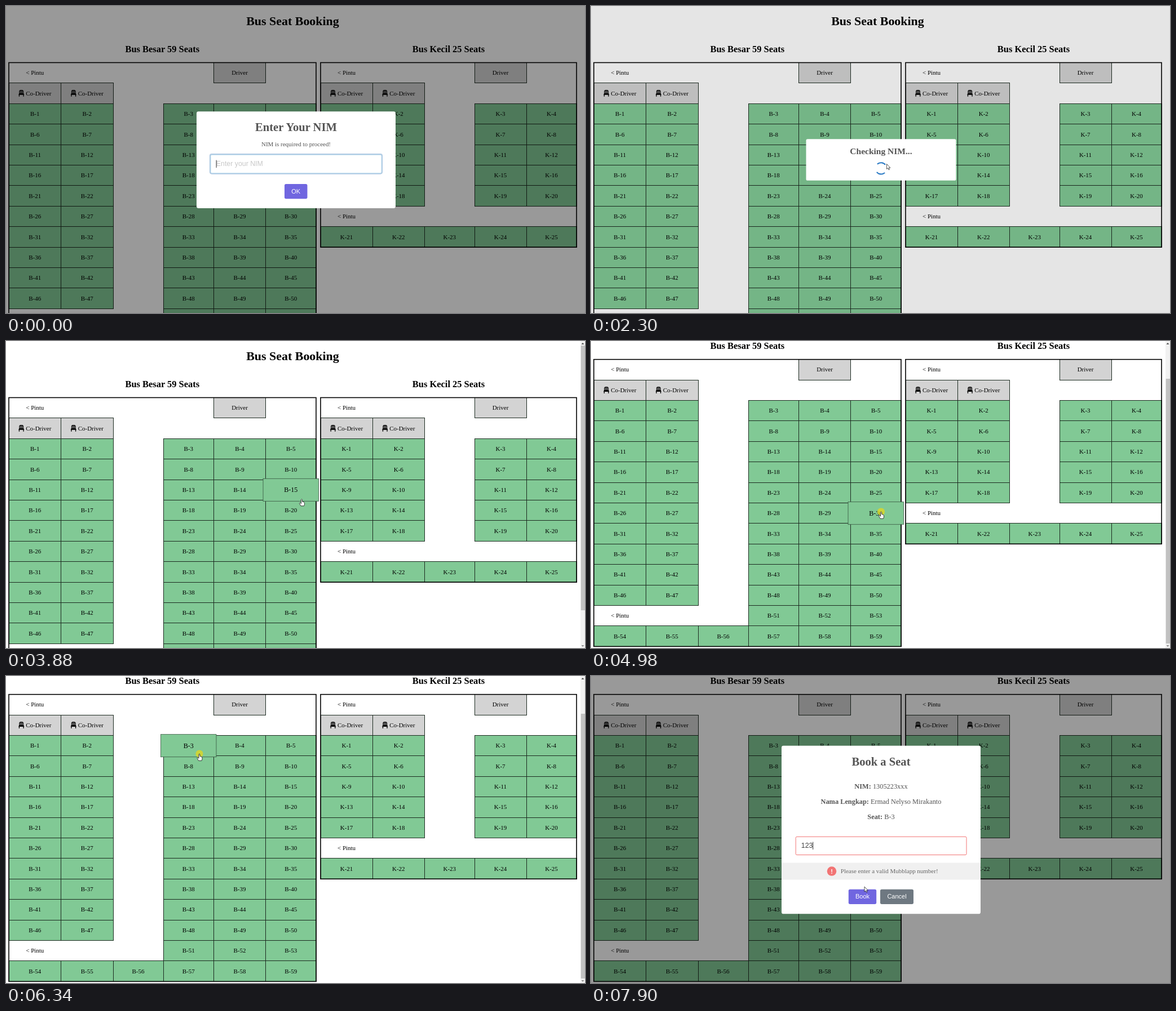
These frames come from a looping animation (1027x545 px, 8000 ms). An HTML page:

```html
<!DOCTYPE html>
<html lang="id">
<head>
<meta charset="utf-8">
<title>Bus Seat Booking</title>
<style>
  html, body { margin: 0; width: 100%; height: 100%; overflow: hidden; background: #fff; }
  svg { display: block; width: 1027px; height: 545px; }
  text { font: 10.97px "Liberation Serif", "Times New Roman", serif; text-anchor: middle; white-space: pre; }
  .h1 { font-size: 21.95px; font-weight: bold; }
  .h2 { font-size: 16.46px; font-weight: bold; }
  .cell { stroke: #1c2a20; stroke-width: 1; shape-rendering: crispEdges; }
  .frame { fill: none; stroke: #000; stroke-width: 1.6; }
  .popup text { fill: #545454; }
  .popup .title { font-size: 20.58px; font-weight: bold; }
  .popup .info { font-size: 12.35px; }
  .popup .field { font: 12.35px "Liberation Sans", Arial, sans-serif; text-anchor: start; }
  .popup .btn { font: 10.97px "Liberation Sans", Arial, sans-serif; fill: #fff; }
</style>
</head>
<body>
<svg viewBox="0 0 1027 545">
  <rect width="1027" height="545" fill="#fff"/>
  <g id="page"></g>
  <g id="hover"></g>
  <g id="scrollbar">
    <rect x="1019" width="8" height="545" fill="#f1f1f1"/>
    <path d="M1020.5 6L1023 3L1025.5 6Z" fill="#505050"/>
    <path d="M1020.5 540L1023 543L1025.5 540Z" fill="#8a8a8a"/>
    <rect id="thumb" x="1019.7" width="7.3" height="470" fill="#c1c1c1"/>
  </g>
  <rect id="backdrop" width="1027" height="545"/>
  <g id="popup" class="popup"></g>
  <circle id="click" r="6.6" fill="#d8d62c" opacity=".85"/>
  <path id="cursor" stroke-linejoin="round"/>
</svg>
<script>
const $ = id => document.getElementById(id);
const LOOP = 8000, ROW = 36.4, TOP = 100.5, MID_X = 514.5, MID_Y = 273.1, SCROLL = 67.8;
const GREEN = '#81c995', GREY = '#d3d3d3';

const clamp = v => Math.max(0, Math.min(1, v));
const mix = (a, b, p) => a + (b - a) * p;

// CSS "ease": cubic-bezier(.25, .1, .25, 1)
function ease(x) {
  x = clamp(x);
  let lo = 0, hi = 1, u = .5;
  for (let i = 0; i < 20; i++) {
    u = (lo + hi) / 2;
    const bx = .75 * u * (1 - u) + u ** 3;
    if (bx < x) lo = u; else hi = u;
  }
  return .3 * u * (1 - u) ** 2 + 3 * u * u * (1 - u) + u ** 3;
}

// Interpolates rows of [time, ...values]
function track(keys, t) {
  if (t <= keys[0][0]) return keys[0].slice(1);
  for (let i = 1; i < keys.length; i++) {
    const a = keys[i - 1], b = keys[i];
    if (t < b[0]) return a.slice(1).map((v, j) => mix(v, b[j + 1], ease((t - a[0]) / (b[0] - a[0]))));
  }
  return keys[keys.length - 1].slice(1);
}

const text = (s, x, y, cls = '', extra = '') => `<text x="${x}" y="${y}" class="${cls}" ${extra}>${s}</text>`;
const box = (x, y, w, h, attrs) => `<rect x="${x}" y="${y}" width="${w}" height="${h}" ${attrs}/>`;

// ---- Page ----
const seats = [];
const bigCols = [5, 97.5, 190, 279, 368.5, 460.5, 550];
const smallCols = [558, 650, 742.5, 831, 923, 1012];

function cell(cols, col, row, label, fill) {
  const x = cols[col], w = cols[col + 1] - x, y = TOP + row * ROW;
  const cx = x + w / 2, base = y + ROW / 2 + 3.6;
  if (fill === GREEN) seats.push({ x, y, w, label });
  return (fill ? box(x, y, w, ROW, `class="cell" fill="${fill}"`) : '') +
    (label === 'Co-Driver' ? chair(cx - 24, y + ROW / 2) + text(label, cx + 6.5, base) : text(label, cx, base));
}

function chair(x, y) {
  return `<g transform="translate(${x} ${y})"><path d="M-3.2 0V-3.5Q-3.2-5.4-1.2-5.4H1.2Q3.2-5.4 3.2-3.5V0M-1.1-5V0M1.1-5V0M-3.8 2V5.6M3.8 2V5.6" fill="none" stroke="#000" stroke-width="1.3"/><path d="M-4-.2H4L5 2.6H-5Z"/></g>`;
}

function bus(prefix, cols, rows, doorRow, driverCol) {
  const last = cols.length - 2;
  let n = 0, out = cell(cols, 0, 0, '&lt; Pintu') + cell(cols, driverCol, 0, 'Driver', GREY) +
    cell(cols, 0, 1, 'Co-Driver', GREY) + cell(cols, 1, 1, 'Co-Driver', GREY) +
    cell(cols, 0, doorRow, '&lt; Pintu');
  for (let row = 2; row < rows; row++) {
    for (let col = 0; col <= last; col++) {
      const aisle = col === 2 && row < rows - 1;
      const door = row === doorRow && (col < 3 || prefix === 'K');
      if (!aisle && !door) out += cell(cols, col, row, `${prefix}-${++n}`, GREEN);
    }
  }
  return out + box(cols[0], TOP, cols[last + 1] - cols[0], rows * ROW, 'class="frame"');
}

$('page').innerHTML = text('Bus Seat Booking', 508.5, 34, 'h1') +
  text('Bus Besar 59 Seats', 277.3, 82.3, 'h2') + text('Bus Kecil 25 Seats', 785, 82.3, 'h2') +
  bus('B', bigCols, 14, 12, 4) + bus('K', smallCols, 9, 7, 3);

// ---- Timeline ----
const popups = [
  { kind: 'nim', from: -1000, to: 2283 },
  { kind: 'load', title: 'Checking NIM...', from: 2283, to: 3397 },
  { kind: 'load', title: 'Loading seats...', from: 3397, to: 3720, closes: true },
  { kind: 'book', seat: 'B-30', from: 5130, to: 5920, closes: true },
  { kind: 'book', seat: 'B-3', from: 6380, to: LOOP, settle: 225 }
];
const HIDE = 150, ERROR_AT = 7840;
const showKeys = [[0, .7], [135, 1.05], [240, .95], [300, 1]];
const nimKeys = [670, 900, 1150, 1400, 1620, 1650, 1680, 2030, 2060, 2100];
const phoneKeys = [7500, 7560, 7630];
const clicks = [[4980, 5120], [5850, 5980], [6290, 6420], [7770, 7835]];
const scrollKeys = [[4160, 0], [4450, SCROLL]];
const mouseKeys = [
  [2283, 524.5, 280.5], [4450, 524.5, 280.5], [4850, 514.5, 303], [5350, 514.5, 303],
  [5700, 543.5, 371], [5930, 543.5, 371], [6260, 343, 138], [6540, 343, 138],
  [6610, 376, 231], [6880, 447, 324], [7630, 447, 324], [7760, 485, 374]
];
const typed = (s, times, t) => s.slice(0, times.filter(k => t >= k).length);
const caretOn = t => !(t >= 270 && t < 670) && !(t >= 7300 && t < 7500);

// ---- Popup ----
const heights = { nim: 171.6, load: 97.6, book: 256.5, error: 298.5 };

function field(y, value, hint, error, t) {
  const ring = error ? '' : box(362, y - 1, 305, 34.5, 'rx="3" fill="none" stroke="#b1cae3" stroke-width="2.2"');
  const caretX = 373 + [...value].reduce((w, c) => w + (c === 'x' ? 6.18 : 6.87), 0);
  return ring +
    box(363.2, y + .3, 302.8, 32.2, `rx="2" fill="#fff" stroke="${error ? '#f27474' : '#b4dbed'}" stroke-width="${error ? 1 : .8}"`) +
    text(value || hint, 372.8, y + 20.2, 'field', `style="fill:${value ? '#444' : '#c8c8c8'}"`) +
    (caretOn(t) ? box(caretX - .4, y + 9.5, 1, 13.5, 'fill="#333"') : '');
}

const button = (label, x, y, w, fill, hot) =>
  box(x, y, w, 26.3, `rx="2.7" fill="${fill}"`) +
  (hot ? box(x, y, w, 26.3, 'rx="2.7" fill="#000" opacity=".1"') : '') +
  text(label, x + w / 2, y + 16.8, 'btn');

const info = (name, value, y) => text(`<tspan font-weight="bold">${name}:</tspan> ${value}`, MID_X, y, 'info');

function spinner(y, age) {
  const r = 13.4, d = r * Math.SQRT1_2;
  const arc = s => `M${-d * s} ${-d * s}A${r} ${r} 0 0 1 ${d * s} ${-d * s}`;
  return `<path d="${arc(1)}${arc(-1)}" transform="translate(${MID_X} ${y}) rotate(${age * .24})" fill="none" stroke="#2778c4" stroke-width="2.75"/>`;
}

function popupMarkup(p, t, mouse) {
  const error = p.kind === 'book' && t >= ERROR_AT;
  const h = heights[error ? 'error' : p.kind], y = MID_Y - h / 2;
  const title = { nim: 'Enter Your NIM', book: 'Book a Seat' }[p.kind] || p.title;
  let out = box(338, y, 353, h, 'rx="3.4" fill="#fff"') + text(title, MID_X, y + 35, 'title');
  let hand = false, beam = false;
  if (p.kind === 'nim') {
    out += text('NIM is required to proceed!', MID_X, y + 61.5) +
      field(y + 76.8, typed('1305223xxx', nimKeys, t), 'Enter your NIM', false, t) +
      button('OK', 494, y + 128.7, 40.5, '#7066e0');
  } else if (p.kind === 'load') {
    out += spinner(y + 69, t - p.from);
  } else {
    const by = y + (error ? 254.8 : 213.3);
    const onRow = mouse.y >= by && mouse.y <= by + 26.3;
    const over = (x, w) => onRow && mouse.x >= x && mouse.x <= x + w;
    const onBook = over(456.8, 49.4), onCancel = over(513, 59);
    hand = onBook || onCancel;
    beam = mouse.x > 363 && mouse.x < 666 && mouse.y > y + 161 && mouse.y < y + 194;
    out += info('NIM', '1305223xxx', y + 76.2) +
      info('Nama Lengkap', 'Ermad Nelyso Mirakanto', y + 103) +
      info('Seat', p.seat, y + 129.8) +
      field(y + 161.2, typed('123', phoneKeys, t), 'No. MB Aktif', error, t);
    if (error) {
      out += box(338, y + 207.7, 353, 30, 'fill="#f0f0f0"') +
        `<circle cx="427" cy="${y + 222.7}" r="8.3" fill="#f27474"/>` +
        text('!', 427, y + 226.7, 'btn', 'style="font-weight:bold"') +
        text('Please enter a valid Mubblapp number!', 529.2, y + 226.4, '', 'style="fill:#666"');
    }
    out += button('Book', 456.8, by, 49.4, '#7066e0', onBook) + button('Cancel', 513, by, 59, '#6e7881', onCancel);
  }
  return { out, hand, beam };
}

// ---- Cursor ----
const cursors = {
  arrow: { d: 'M0 0V9L2.1 7.2L3.6 10.4L5 9.7L3.6 6.7H6.4Z', fill: '#fff', stroke: '#111', width: .7 },
  hand: { d: 'M-1 1Q0-.6 1 1V4.6Q4.8 4.8 5 7V9Q4.8 11 4 12.3H-1.4Q-4 8.4-4 7.2Q-3.4 6-2 7.3L-1 8.2Z', fill: '#fff', stroke: '#111', width: .8 },
  beam: { d: 'M-2-5.5H2M0-5.5V5.5M-2 5.5H2', fill: 'none', stroke: '#222', width: .9 }
};

function drawCursor(kind, x, y) {
  const c = cursors[kind], el = $('cursor');
  el.setAttribute('d', c.d);
  el.setAttribute('fill', c.fill);
  el.setAttribute('stroke', c.stroke);
  el.setAttribute('stroke-width', c.width);
  el.setAttribute('transform', `translate(${x} ${y})`);
}

const show = (id, on) => $(id).setAttribute('visibility', on ? 'visible' : 'hidden');

function render(t) {
  const [scroll] = track(scrollKeys, t);
  const [x, y] = track(mouseKeys, t);
  const mouseOn = t >= 2283;
  $('page').setAttribute('transform', `translate(0 ${-scroll})`);

  const p = popups.find(q => t >= q.from && t < q.to + (q.closes ? HIDE : 0));
  let kind = 'arrow', shade = 0;
  $('popup').innerHTML = '';
  if (p) {
    const age = t - p.from, leaving = t - p.to;
    const part = popupMarkup(p, t, { x, y });
    const out = ease(leaving / HIDE);
    const scale = leaving > 0 ? mix(1, .5, out) : age >= (p.settle || 300) ? 1 : track(showKeys, age)[0];
    shade = leaving > 0 ? 1 - ease(leaving / 100) : ease(age / 100);
    $('popup').innerHTML = part.out;
    $('popup').setAttribute('transform', `translate(${MID_X} ${MID_Y}) scale(${scale}) translate(${-MID_X} ${-MID_Y})`);
    $('popup').setAttribute('opacity', 1 - out);
    if (part.hand) kind = 'hand';
    if (part.beam) kind = 'beam';
  }
  $('backdrop').setAttribute('opacity', .4 * shade);

  const seat = !p && seats.find(s => x >= s.x && x < s.x + s.w && y + scroll >= s.y && y + scroll < s.y + ROW);
  $('hover').innerHTML = '';
  if (seat) {
    kind = 'hand';
    const cx = seat.x + seat.w / 2, cy = seat.y + ROW / 2;
    $('hover').setAttribute('transform', `translate(${cx} ${cy - scroll}) scale(1.1)`);
    $('hover').innerHTML = box(-seat.w / 2, -ROW / 2, seat.w, ROW, `fill="${GREEN}" stroke="#33503c" stroke-width=".7"`) +
      text(seat.label, 0, 3.6);
  }

  show('scrollbar', !p);
  $('thumb').setAttribute('y', 8 + 59 * scroll / SCROLL);
  show('click', clicks.some(([a, b]) => t >= a && t < b));
  $('click').setAttribute('cx', x);
  $('click').setAttribute('cy', y);
  show('cursor', mouseOn);
  drawCursor(kind, x, y);
}

const start = performance.now();
function tick() {
  render((performance.now() - start) % LOOP);
  requestAnimationFrame(tick);
}
tick();
</script>
</body>
</html>
```
